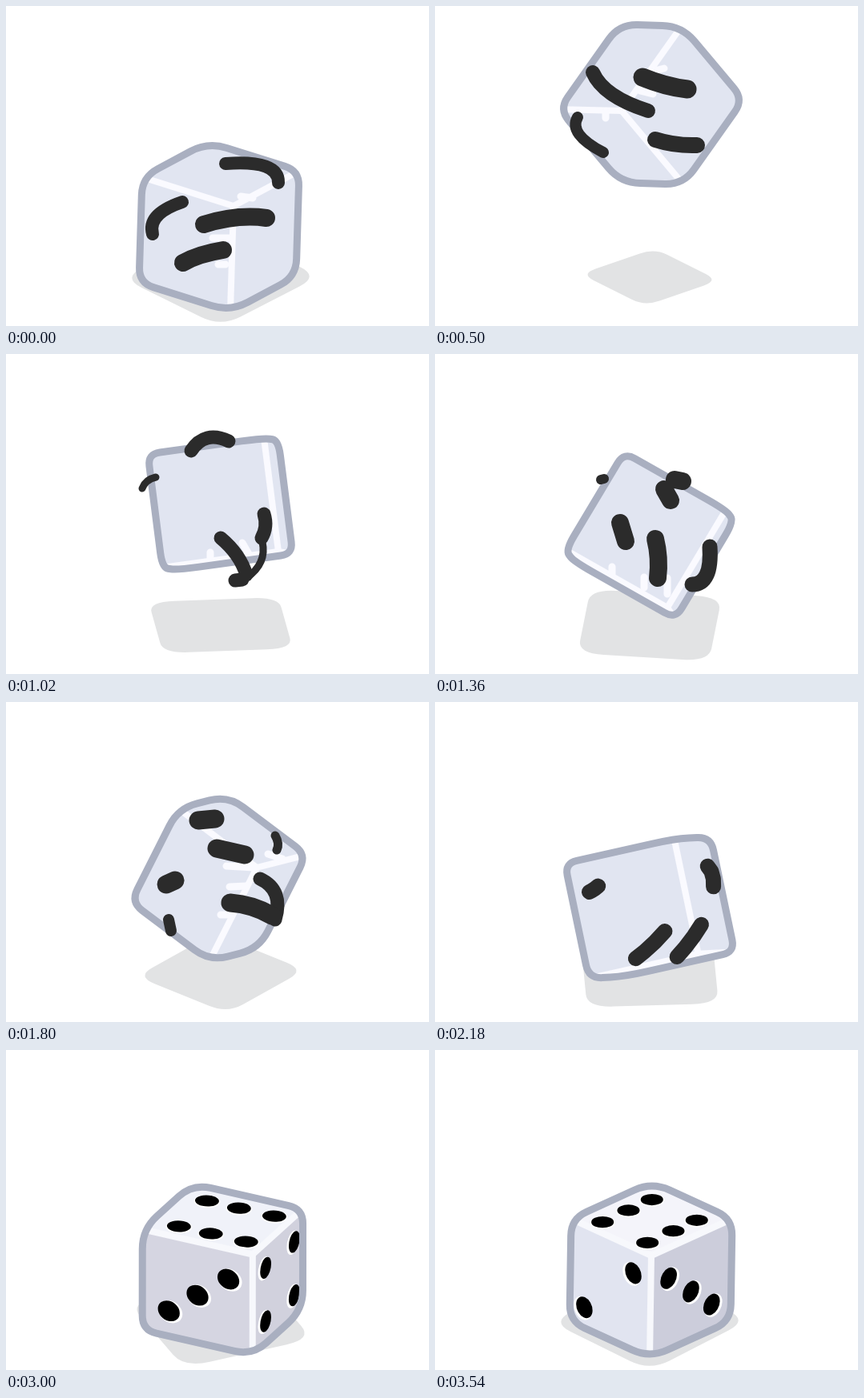
Animation of 528 by 400 pixels, one loop 3560 ms. Source, as an HTML page with a canvas:

```html
<!DOCTYPE html>
<html lang="en">
<head>
<meta charset="utf-8">
<title>Rolling die</title>
<style>
  html, body { margin: 0; width: 100%; height: 100%; overflow: hidden; background: #fff; }
  canvas { display: block; }
</style>
</head>
<body>
<canvas width="528" height="400"></canvas>
<script>
const ctx = document.querySelector('canvas').getContext('2d');
const LOOP = 3560, STEP = 20, EDGE = 147, SHADED_FROM = 2480, LANDED = 2580;

// box: nearest corner, then the three edges leaving it. shadow: two half diagonals.
const keys = [
  { t: 0, hold: 20, turns: 3, axis: [.8, .5, .33],
    box: [[284, 250], [-114, -36], [82, -44], [-4, 132]], shadow: [[123, -1], [0, 62]],
    ink: { 22: 'M247 273Q289 260 325 265M221 321Q240 310 271 305',
           16: 'M274 197Q341 192 340 221M220 245Q176 260 183 285' },
    drips: 'M293 238L308 240M258 290H278M265 323H274' },
  { t: 500, hold: 20, turns: 3, axis: [.7, -.6, .39],
    box: [[233, 131], [-78, -2], [75, -106], [77, 92]], shadow: [[86, 4], [-6, 36]],
    ink: { 23: 'M259 89Q288 101 315 104', 20: 'M275 167Q300 175 327 174', 18: 'M197 83Q210 113 266 131',
           14: 'M178 139Q166 160 210 183' },
    drips: 'M286 78L270 82M256 106L272 110M213 140V132' },
  { t: 1020, hold: 60, turns: 2, axis: [.9, .3, -.31],
    box: [[340, 247], [-145, 20], [-18, -142], [18, 3]], shadow: [[90, 29], [-72, 35]],
    ink: { 17: 'M231 121Q248 95 278 109M268 230Q292 250 300 276M322 200Q327 216 319 230M286 283L295 282',
           9: 'M170 168Q174 157 187 154M320 235Q326 262 300 280' },
    drips: 'M255 248V257M295 236L303 250' },
  { t: 1360, hold: 20, turns: 2, axis: [.6, .7, .39],
    box: [[290, 317], [-127, -72], [73, -122], [10, 14]], shadow: [[74, 45], [-90, 35]],
    ink: { 22: 'M231 211L238 234M275 231Q281 255 278 280M286 169L294 183M299 157L309 159',
           19: 'M343 241Q346 288 321 288', 12: 'M207 157L211 156' },
    drips: 'M221 266V276M261 279V292M290 280V300' },
  { t: 1800, hold: 40, turns: 3, axis: [.7, .6, -.39], ease: 2,
    box: [[313, 207], [-98, -74], [62, -16], [-59, 117]], shadow: [[105, -4], [8, 50]],
    ink: { 23: 'M240 148L261 146M263 183L298 191M200 228L211 223M280 251Q308 253 332 267',
           17: 'M317 221Q347 235 336 272', 14: 'M203 272L206 286', 11: 'M336 167Q342 177 338 185' },
    drips: 'M275 205L310 207M279 231L300 230M268 266H282M327 190L345 196' },
  { t: LANDED, hold: 20, turns: 1, ease: 3,
    box: [[275, 268], [-98, -36], [82, -69], [8, 117]], shadow: [[123, -1], [0, 62]] },
  { t: 3540, hold: 20, turns: 0,
    box: [[270, 257], [-100, -46], [101, -46], [-2, 128]], shadow: [[123, -1], [0, 62]] }
];
keys.push({ ...keys[0], t: LOOP });

// start, end, height of each bounce
const bounces = [[0, 1200, 155], [1200, 2100, 68], [2100, 2560, 36], [2600, 2960, 8]];

const lerp = (a, b, s) => a + (b - a) * s;
const mix = (p, q, s) => p.map((v, i) => lerp(v, q[i], s));
const add = (...vs) => vs.reduce((p, q) => [p[0] + q[0], p[1] + q[1]]);
const scale = (v, k) => v.map(x => x * k);
const unit = v => scale(v, 1 / (Math.hypot(...v) || 1));
const dot = (p, q) => p.reduce((sum, x, i) => sum + x * q[i], 0);
const cross = (p, q) => p.map((_, i) => {
  const j = (i + 1) % 3, l = (i + 2) % 3;
  return p[j] * q[l] - p[l] * q[j];
});

function rotate(v, k, angle) {
  const c = Math.cos(angle), s = Math.sin(angle), side = cross(k, v), along = dot(k, v) * (1 - c);
  return v.map((x, i) => x * c + side[i] * s + k[i] * along);
}

function squared([a, b]) {
  const u = unit(a), w = unit(cross(b, u));
  return [u, cross(u, w), w].map(v => scale(v, EDGE));
}

function height(t) {
  const b = bounces.find(([start, end]) => t >= start && t < end);
  if (!b) return 0;
  const u = (t - b[0]) / (b[1] - b[0]);
  return 4 * b[2] * u * (1 - u);
}
const shrink = t => 1 - .3 * height(t) / 155;

// Projected edges gain the depth they need to be full length
for (const key of keys) {
  const [corner, ...edges] = key.box;
  key.center = add(corner, ...edges.map(e => scale(e, .5)));
  key.edges = edges.map(([x, y]) => [x, y, -Math.sqrt(Math.max(0, EDGE ** 2 - x * x - y * y))]);
}

function poseAt(t) {
  const i = Math.max(0, keys.findIndex(k => k.t > t) - 1);
  const a = keys[i], b = keys[i + 1];
  const s = Math.max(0, t - a.t - a.hold) / Math.max(1, b.t - a.t - a.hold);
  const e = 1 - (1 - s) ** (a.ease || 1);
  const angle = e * a.turns * 2 * Math.PI;

  let { edges, center, shadow } = a;
  if (s > 0) {
    edges = edges.map((v, n) => mix(v, b.edges[n], e));
    if (a.axis) edges = squared(edges);
    const axis = unit(a.axis || edges[2]);
    edges = edges.map(v => rotate(v, axis, angle));

    center = mix(center, b.center, s);
    center[1] += lerp(height(a.t), height(b.t), s) - height(t);

    const [p, q] = shadow.map((v, n) => mix(v, b.shadow[n], s));
    const k = shrink(t) / lerp(shrink(a.t), shrink(b.t), s);
    const c = Math.cos(angle) * k, d = Math.sin(angle) * k;
    shadow = [add(scale(p, c), scale(q, d)), add(scale(q, c), scale(p, -d))];
  }
  return { center, edges, shadow, key: a, moving: s > 0 };
}

// Closed path; reach(turn, length) is how far a corner's curve runs along its edges
function rounded(points, reach) {
  const path = new Path2D(), n = points.length;
  points.forEach((p, i) => {
    const into = add(p, scale(points[(i + n - 1) % n], -1));
    const out = add(points[(i + 1) % n], scale(p, -1));
    const u = unit(into), v = unit(out), turn = dot(u, v);
    const from = add(p, scale(u, -reach(turn, Math.hypot(...into))));
    const to = add(p, scale(v, reach(turn, Math.hypot(...out))));
    path[i ? 'lineTo' : 'moveTo'](...from);
    path.quadraticCurveTo(...p, ...to);
  });
  path.closePath();
  return path;
}

function stroke(path, color, width) {
  ctx.strokeStyle = color;
  ctx.lineWidth = width;
  ctx.stroke(path);
}
function fill(path, color) {
  ctx.fillStyle = color;
  ctx.fill(path);
}
const line = points => {
  const path = new Path2D();
  points.forEach(p => path.lineTo(...p));
  return path;
};

const pips = {
  six: [.2, .76].flatMap(u => [.15, .47, .76].map(v => [u, v])),
  four: [.26, .83].flatMap(u => [.25, .78].map(v => [u, v])),
  two: [[.22, .25], [.82, .8]],
  rising: [[.84, .33], [.5, .54], [.15, .78]],
  falling: [[.22, .3], [.5, .53], [.76, .75]]
};

function drawPip(at, u, v, shift) {
  const disc = (r, dx, dy) => {
    const path = new Path2D(), circle = new Path2D();
    circle.arc(0, 0, r, 0, 7);
    path.addPath(circle, new DOMMatrix([u[0], u[1], v[0], v[1], at[0] + dx, at[1] + dy]));
    return path;
  };
  const halo = disc(.1, shift, 1), spot = disc(.09, 0, 0);
  fill(halo, '#fff');
  stroke(halo, '#fff', 2.5);
  fill(spot, '#000');
  stroke(spot, '#000', 2.5);
}

function drawFaces(t, corner, edges, flipped) {
  const [a, b, c] = edges, early = t < 2810;
  const s = Math.min(1, Math.max(0, (t - LANDED) / 960));
  const tone = (p, q) => `rgb(${mix(p, q, s).map(Math.round)})`;
  const top = tone([237, 240, 248], [244, 244, 250]);
  const left = tone([203, 201, 214], [225, 228, 240]);
  const right = tone([213, 212, 222], [204, 205, 219]);
  const faces = [
    [a, b, top, pips.six, 0],
    [a, c, a[0] < 0 ? left : right, early || flipped[1] ? pips.four : pips.two, -2],
    [b, c, b[0] < 0 ? left : right, flipped[0] ? pips.two : early ? pips.rising : pips.falling, 2]
  ];
  for (const [u, v, color] of faces)
    fill(line([corner, add(corner, u), add(corner, u, v), add(corner, v)]), color);
  for (const e of edges) stroke(line([corner, add(corner, e)]), '#f7f8fc', 8);
  for (const [u, v, , spots, shift] of faces)
    for (const [x, y] of spots) drawPip(add(corner, scale(u, x), scale(v, y)), u, v, shift);
}

// Blurred pips: each runs along the way it has just come
function drawTrails(t) {
  const poses = [0, 7, 14, 20].map(d => poseAt(t - d));
  for (let n = 0; n < 3; n++) for (const side of [-.5, .5]) {
    if (![poses[0], poses[3]].every(p => p.edges[n][2] * side > 8)) continue;
    for (const k of [-.25, .25]) {
      const trail = poses.map(({ center, edges }) => add(center, scale(edges[n], side),
        scale(edges[(n + 1) % 3], k), scale(edges[(n + 2) % 3], -k)));
      stroke(line(trail), '#2b2b2b', 19);
    }
  }
}

function draw(t) {
  const { center, edges, shadow: [p, q], key, moving } = poseAt(t);
  const shaded = t >= SHADED_FROM;
  ctx.fillStyle = '#fff';
  ctx.fillRect(0, 0, 528, 400);
  ctx.lineCap = ctx.lineJoin = 'round';

  const ground = [p, q, scale(p, -1), scale(q, -1)].map(v => add([268, 339], v));
  fill(rounded(ground, (turn, length) => length * .2), '#e2e3e4');

  // Turn every edge away from the viewer, so that they meet in the nearest corner
  const flipped = edges.map(e => e[2] > 0);
  const [a, b, c] = edges.map(e => scale(e, e[2] > 0 ? -1 : 1));
  const corner = add(center, scale(add(a, b, c), -.5));
  const outline = [a, add(a, b), b, add(b, c), c, add(c, a)].map(v => add(corner, v));
  const body = rounded(outline, (turn, length) =>
    Math.min(15 + 14 * Math.max(0, turn), length * .4));

  fill(body, '#e1e5f1');
  ctx.save();
  ctx.clip(body);
  if (shaded) {
    drawFaces(t, corner, [a, b, c], flipped);
  } else {
    for (const e of [a, b, c]) stroke(line([corner, add(corner, e)]), '#fafaff', 8);
    if (!moving) stroke(new Path2D(key.drips), '#fafaff', 9);
  }
  ctx.restore();
  stroke(body, '#a9afc0', 9);

  if (shaded) return;
  if (moving) drawTrails(t);
  else for (const [width, path] of Object.entries(key.ink)) stroke(new Path2D(path), '#2b2b2b', +width);
}

let start;
function tick(now) {
  start ??= now;
  const t = (now - start) % LOOP;
  draw(t - t % STEP);
  requestAnimationFrame(tick);
}
requestAnimationFrame(tick);
</script>
</body>
</html>
```
